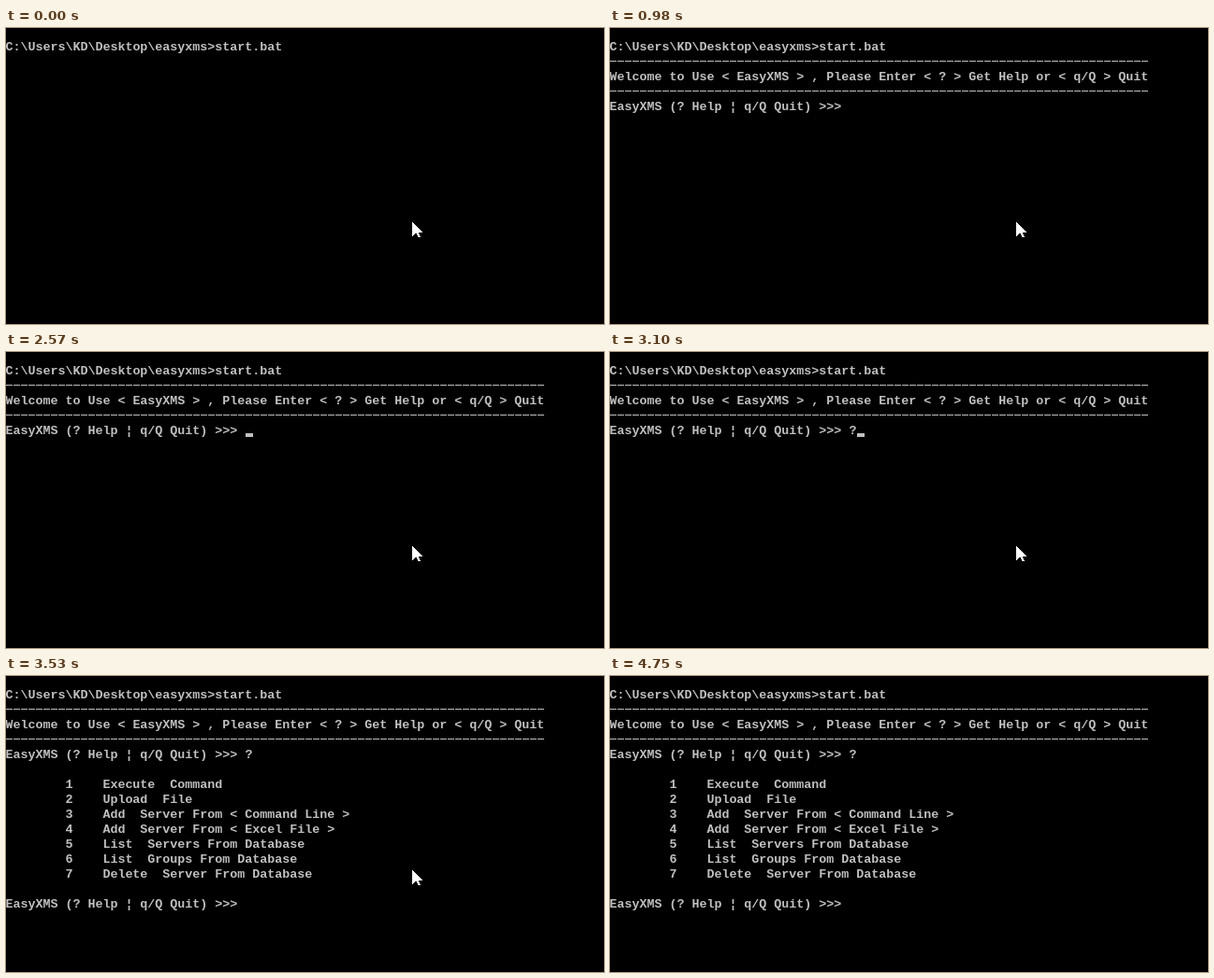
An HTML page that plays this animation: 639x317 px, repeating every 5100 ms.

```html
<!DOCTYPE html>
<html lang="en">
<head>
<meta charset="utf-8">
<title>Console session</title>
<style>
html, body { margin: 0; width: 100%; height: 100%; overflow: hidden; background: #000; }
svg { display: block; }
text { font: bold 13.333px "Liberation Mono", monospace; white-space: pre; fill: #c0c0c0; }
rect { fill: #c0c0c0; }
</style>
</head>
<body>
<svg width="639" height="317" viewBox="0 0 639 317">
  <g id="screen"></g>
  <rect id="caret" width="8" height="4" shape-rendering="crispEdges"/>
  <path id="mouse" fill="#fff" shape-rendering="crispEdges" d="M0 0H.6L10.6 10V11H6.6L9 16H6.5L4.4 11.4L0 15Z"/>
</svg>
<script>
const LOOP = 5100, COL = 8, ROW = 16, BASE = 24;
const PROMPT = 'EasyXMS (? Help ¦ q/Q Quit) >>> ';
const MENU = [
  'Execute  Command',
  'Upload  File',
  'Add  Server From < Command Line >',
  'Add  Server From < Excel File >',
  'List  Servers From Database',
  'List  Groups From Database',
  'Delete  Server From Database'
];

const screen = document.getElementById('screen');
const caret = document.getElementById('caret');
const mouse = document.getElementById('mouse');
const timed = [];

function add(tag, start, attrs, content = '') {
  const el = document.createElementNS('http://www.w3.org/2000/svg', tag);
  for (const key in attrs) el.setAttribute(key, attrs[key]);
  el.textContent = content;
  screen.append(el);
  timed.push({ el, start });
}

function write(start, row, col, content) {
  add('text', start, { x: col * COL - 0.6, y: BASE + row * ROW }, content);
}

function rule(start, row) {
  for (let i = 0; i < 72; i++) {
    add('rect', start, { x: i * COL, y: row * ROW + 19, width: 7, height: 1 });
  }
}

write(0, 0, 0, 'C:\\Users\\KD\\Desktop\\easyxms>start.bat');
rule(980, 1);
write(980, 2, 0, 'Welcome to Use < EasyXMS > , Please Enter < ? > Get Help or < q/Q > Quit');
rule(980, 3);
write(980, 4, 0, PROMPT);
write(3100, 4, 32, '?');
MENU.forEach((label, i) => write(3530, 6 + i, 8, `${i + 1}    ${label}`));
write(3530, 14, 0, PROMPT);

// Visible spans of the caret: start, end, column, row
const carets = [
  [580, 860, 37, 0],
  [1540, 2130, 32, 4],
  [2570, 3100, 32, 4],
  [3100, 3380, 33, 4],
  [4240, 4750, 32, 14]
];

// Pointer positions: start, x, y
const moves = [
  [0, 434, 208],
  [4240, 446, 224],
  [4370, 479, 261],
  [4510, 510, 277],
  [4630, 538, 292],
  [4750, -50, -50]
];

function draw(now) {
  const t = now % LOOP;
  for (const { el, start } of timed) el.style.display = t >= start ? '' : 'none';

  const span = carets.find(([from, to]) => t >= from && t < to);
  caret.style.display = span ? '' : 'none';
  if (span) {
    caret.setAttribute('x', span[2] * COL);
    caret.setAttribute('y', span[3] * ROW + BASE - 1);
  }

  const [, x, y] = moves.findLast(move => t >= move[0]);
  mouse.setAttribute('transform', `translate(${x} ${y})`);
}

function tick() {
  draw(performance.now());
  requestAnimationFrame(tick);
}
tick();
</script>
</body>
</html>
```
